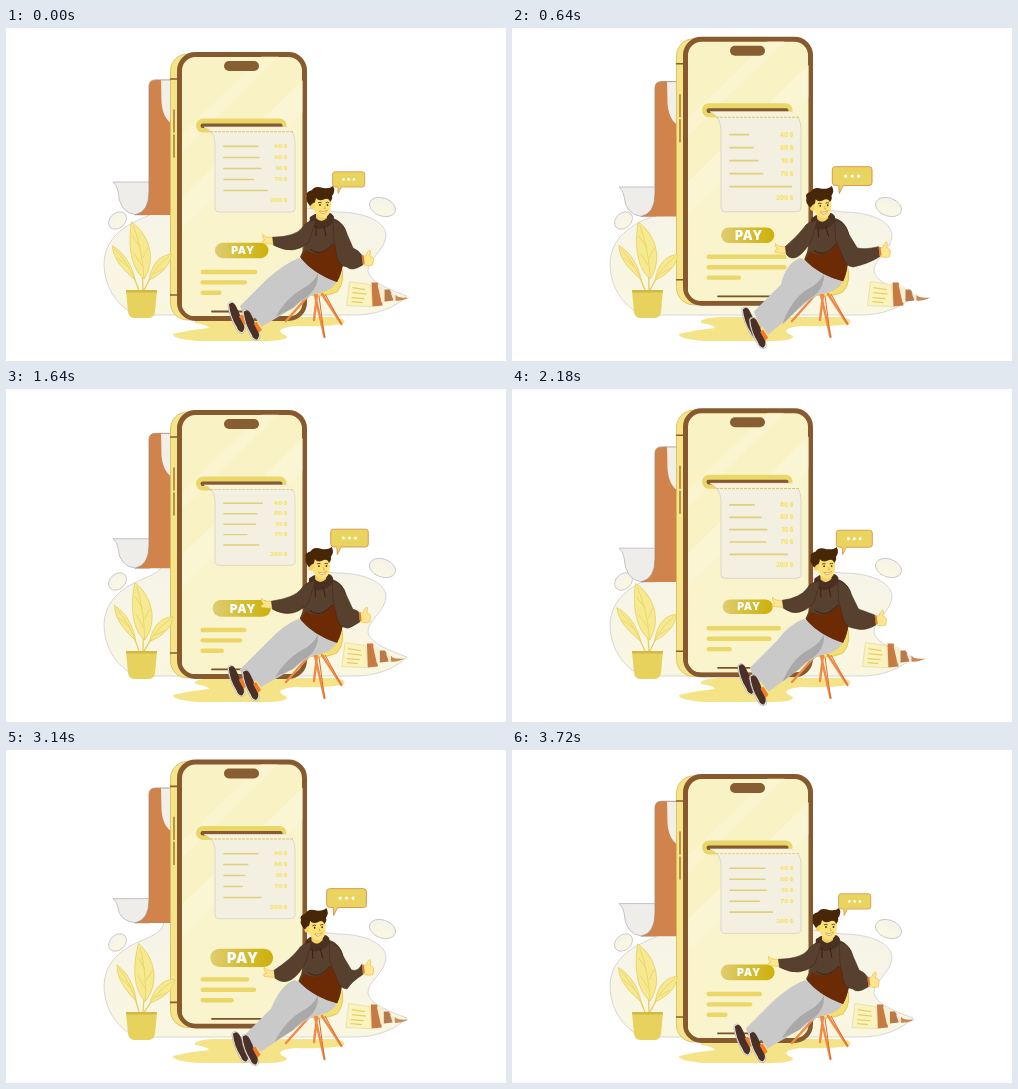
Animation, 500 px wide and 333 px high, one loop 3.74 s. Source, as an HTML page:

```html
<!DOCTYPE html>
<html lang="en">
<head>
<meta charset="utf-8">
<title>Mobile payment</title>
<style>
html, body { margin: 0; width: 100%; height: 100%; overflow: hidden; background: #fff; }
svg { display: block; width: 100vw; height: 100vh; }
text { font-family: Inter, Roboto, sans-serif; font-weight: 900; }
</style>
</head>
<body>
<svg viewBox="0 0 500 333">
  <defs>
    <clipPath id="screen"><rect x="175.5" y="4.5" width="121" height="260" rx="14"/></clipPath>
    <linearGradient id="gold" x1="0" x2="1">
      <stop offset="0" stop-color="#dfcd72"/><stop offset=".45" stop-color="#d6bf3c"/><stop offset="1" stop-color="#cdb00a"/>
    </linearGradient>
    <linearGradient id="ground" x1="0" y1="0" x2="0" y2="1">
      <stop offset="0" stop-color="#f5f3e9"/><stop offset="1" stop-color="#faf7e0"/>
    </linearGradient>
  </defs>

  <!-- backdrop -->
  <g stroke="#c9c7cd" stroke-width=".9" fill="url(#ground)">
    <path d="M165 166Q159 167 158 172C156 182 148 185 137 190C112 200 98 215 98 237C99 262 113 279 130 287H345C370 288 390 279 401 268C382 261 364 254 362 243C361 232 380 222 380 207C379 193 358 184 331 184L300 180Z" stroke-opacity=".8"/>
    <ellipse cx="376.5" cy="179" rx="13.5" ry="9" transform="rotate(20 376.5 179)"/>
    <ellipse cx="111.5" cy="192.5" rx="10" ry="7.5" transform="rotate(-42 111.5 192.5)"/>
  </g>
  <path d="M167 306Q182 302 203 300Q202 297 189 295Q187 290 208 289H325Q341 290 338 295Q326 299 289 298Q264 301 281 308Q282 314 246 313H192Q166 311 167 306Z" fill="#f5e387"/>

  <!-- long paper strip behind the phone -->
  <path id="roll" fill="#efedea" stroke="#bfbdc4" stroke-width=".9"/>
  <g id="strip">
    <path d="M143 6Q143 0 150 0H170V135H129Q143 132 143 112Z" fill="#d0834b"/>
    <path d="M155 0H171V46Q157 42 155.5 22Z" fill="#f1efe8"/>
    <path d="M129 135Q143 132 143 112V6Q143 0 150 0H170" fill="none" stroke="#a98a78" stroke-width=".8"/>
  </g>

  <!-- phone -->
  <g id="phone">
    <rect x="164.5" y="2" width="130" height="266" rx="17" fill="#f6e489" stroke="#d8b95a" stroke-width=".8"/>
    <path d="M164 27h8M164 243h8" stroke="#8a5a32" stroke-width="1.6"/>
    <path d="M168 58v22M168 83v22" stroke="#a9803a" stroke-width="1.6" stroke-linecap="round"/>
    <rect x="173.5" y="2.5" width="125" height="264" rx="16" fill="#f9f2c5" stroke="#86592f" stroke-width="5"/>
    <g clip-path="url(#screen)">
      <path d="M176 145L297 28V264H176Z" fill="#faf4cc"/>
      <path d="M176 145L297 28V60L176 177ZM176 82L256 4H273L176 99Z" fill="#fcf7da" opacity=".5"/>
    </g>
    <rect x="218" y="9" width="35" height="10" rx="5" fill="#875d32"/>
    <path d="M206 259.5h60" stroke="#7a5329" stroke-width="1.8" stroke-linecap="round"/>
    <rect x="190" y="66.5" width="90.5" height="14" rx="7" fill="#e9d768"/>
    <rect x="194.5" y="71.5" width="82" height="4.6" rx="2.3" fill="#86592f"/>
    <g id="bars" stroke="#ead768" stroke-width="4.4" stroke-linecap="round"></g>
    <g id="receipt">
      <path d="M198 0H279Q289 3 289 18V96Q289 100 285 100H213Q209 100 209 96V18Q208 4 198 0Z" fill="#f3f0e2" stroke="#d4d0c6" stroke-width=".8"/>
      <path d="M198 0H279Q285 1 287 5H205Q202 1 198 0Z" fill="#f7f2d9"/>
      <path d="M204 5.5H287" stroke="#dfc764" stroke-width="1.1" stroke-dasharray="3 1"/>
      <g id="rows" stroke="#dfd07b" stroke-width="1.8" stroke-linecap="round"></g>
      <g id="sums" fill="#f8e26a" font-size="6" text-anchor="end"></g>
    </g>
    <rect id="pill" x="-28" y="-8.1" width="56" height="16.2" rx="8.1" fill="url(#gold)"/>
    <g id="pay"><text x=".4" y="4.4" text-anchor="middle" font-size="12.4" letter-spacing=".8" fill="#fff">PAY</text></g>
  </g>

  <!-- plant -->
  <g id="plant" fill="#f7e98f" stroke="#e5cf62" stroke-width=".8">
    <path d="M137 263Q136 222 127 198M138 262Q148 240 163 228M133 262Q124 238 108 221" fill="none" stroke-width="1.3"/>
    <path d="M143 252C145 238 152 227 165 226C164 238 155 246 143 252Z"/>
    <path d="M129 252C119 243 107 233 106 218C117 224 126 237 129 252Z"/>
    <path d="M138 251C123 239 122 213 125 194C142 206 151 230 138 251Z"/>
    <path d="M138 251Q136 221 127 198M143 252Q150 238 163 228M129 252Q121 234 108 221M136 238L128 226M136.5 230L142 219M134 219L126 208M147 246L158 240M122 239L111 230" fill="none" stroke-width=".7"/>
  </g>
  <path d="M120 262H151L149 284Q148 290 142 290H129Q123 290 122 284Z" fill="#e6d25c"/>
  <path d="M120 262H151L150.8 264.5H120.2Z" fill="#d2b945"/>

  <!-- receipts and boxes -->
  <g id="pile">
    <path d="M1 0L22 3L24 25L-2 24Z" fill="#fbf3bd" stroke="#e3d9a8" stroke-width=".7"/>
    <path d="M4 6L17 8M4 11L18 12.5M3 16L16 17M3 20L14 21" stroke="#e5ce68" stroke-width="1.2"/>
    <path d="M23 1H29Q33 9 34 24L24 25Z" fill="#c77a42"/>
    <path d="M29 3L36 6L39 20L33 21Z" fill="#f5efd2"/>
    <path d="M36 8H41Q44 12 45 19L36 20Z" fill="#b97a4b"/>
    <path d="M42 11L48 15V19L45 19Z" fill="#f1ead0"/>
    <path d="M47 13Q49 17 61 16Q52 20 47 19Z" fill="#c98a58"/>
  </g>

  <!-- chair -->
  <path d="M334 234Q341 252 331 264Q317 270 304 267L310 256Z" fill="#f3df74" stroke="#ddc352" stroke-width=".8"/>
  <path d="M304 266L280 293M309 267L318.5 309M316 266L335.5 296M311 267L308 292" fill="none" stroke="#f08a47" stroke-width="2.4" stroke-linecap="round"/>
  <path d="M313 268L318.5 309M319 266L335.5 296" stroke="#d86f35" stroke-width="1"/>

  <!-- legs -->
  <path id="legA" fill="#c9c9c9"/>
  <g id="shoeA"></g>
  <path id="legB" fill="#c9c9c9"/>
  <path id="fold" fill="#a9a9aa"/>
  <g id="shoeB"></g>

  <!-- upper body -->
  <g fill="#fde68d" stroke="#e8b94c" stroke-width=".6">
    <path id="handL" d="M7 -2Q0 -1 -3 -5Q-4 -3 -1 1Q-5 2 -3 4Q2 5 9 5Z"/>
    <path id="handR" d="M-6 -4L-1 -4Q1 -9 3 -10Q5 -9 3 -4Q7 -3 7 0L6 5Q2 7 -5 4Z"/>
  </g>
  <g id="torso">
    <path d="M308 190Q300 193 299 202Q302 215 294 229Q306 245 331 254Q340 236 341 210Q339 194 327 190Z" fill="#57402e"/>
    <path d="M300 222Q312 230 324 220Q330 213 334 218Q338 222 337 232Q336 246 331 254Q308 246 295 230Z" fill="#6d2b05"/>
    <path d="M304 221Q314 230 327 216" fill="none" stroke="#3f2819" stroke-width="1"/>
    <path d="M304 189Q302 198 313 201Q328 199 328 189Q325 183 320 186H309Z" fill="#4a3021"/>
    <path d="M310 198v10M318 198l2 10" stroke="#33200f" stroke-width=".9"/>
    <path d="M310 181H321V190Q315 196 310 190Z" fill="#f3cf68"/>
    <path d="M307 170Q308 164 317 165Q326 166 325 176Q325 188 318 190Q308 189 307 177Z" fill="#fde277"/>
    <ellipse cx="306" cy="178" rx="2.4" ry="3.2" fill="#f8d460"/>
    <path d="M304 178Q299 172 301 168Q299 164 306 162Q309 157 317 160Q324 161 327 158Q330 163 326 168Q327 171 324 174Q323 170 319 171Q313 174 310 170Q309 176 307 175Z" fill="#482706"/>
    <path d="M312 174.8q2-1 3.6 0M319.6 174.8q2-1 3.4 0" fill="none" stroke="#482706" stroke-width=".8"/>
    <circle cx="314" cy="177" r=".9" fill="#482706"/><circle cx="321.5" cy="177" r=".9" fill="#482706"/>
    <path d="M318 178l1.5 2.5h-1.6" fill="none" stroke="#d99a35" stroke-width=".7"/>
    <path d="M313.5 183Q317.5 184.6 321.5 182.4Q320 185.4 317 185.6Q314.5 185.4 313.5 183Z" fill="#fff" stroke="#b5752f" stroke-width=".5"/>
  </g>
  <path id="armL" fill="#57402e" stroke="#412a1b" stroke-width=".6"/>
  <path id="armR" fill="#57402e" stroke="#412a1b" stroke-width=".6"/>
  <path id="cuffR" fill="none" stroke="#e07a2d" stroke-width="2"/>

  <!-- speech bubble, tail tip at the origin -->
  <g id="bubble">
    <path d="M-4 -27H30Q33 -27 33 -24V-11Q33 -8 30 -8H4L0 0L-.5 -8H-3Q-7 -8 -7 -11V-24Q-7 -27 -4 -27Z" fill="#e8d45f" stroke="#d98d48" stroke-width=".9"/>
    <g fill="#fff"><circle cx="6.5" cy="-17.5" r="1.6"/><circle cx="13" cy="-17.5" r="1.6"/><circle cx="19.5" cy="-17.5" r="1.6"/></g>
  </g>
</svg>
<script>
const LOOP = 3740, BEAT = LOOP / 2;
const NS = 'http://www.w3.org/2000/svg';
const $ = id => document.getElementById(id);

function add(parent, tag, attrs, text) {
  const el = document.createElementNS(NS, tag);
  for (const k in attrs) el.setAttribute(k, attrs[k]);
  if (text) el.textContent = text;
  return parent.appendChild(el);
}
const move = (id, value) => $(id).setAttribute('transform', value);
const shape = (id, d) => $(id).setAttribute('d', d);

// bars: [mean width, swing, time of the widest]
const rowWaves = [[30, 10, 1575], [28.5, 7.8, 0], [30, 9.5, 150], [28.5, 9, 380], [49, 14.5, 560]];
const barWaves = [[62, 18.5, 560], [61, 19.5, 720], [29.5, 8.6, 930]];
const rows = rowWaves.map((_, i) => add($('rows'), 'line', { x1: 218, y1: 22.8 + 13 * i, y2: 22.8 + 13 * i }));
const bars = barWaves.map((_, i) => add($('bars'), 'line', { x1: 196.7, y1: 220 + 10.4 * i, y2: 220 + 10.4 * i }));
['40 $', '80 $', '10 $', '70 $'].forEach((s, i) => add($('sums'), 'text', { x: 281.5, y: 25 + 13 * i }, s));
add($('sums'), 'text', { x: 281.5, y: 88 }, '200 $');

// toes at the origin, heel down to the right
for (const id of ['shoeA', 'shoeB']) {
  add($(id), 'path', { d: 'M-1 1Q1 -3 5 0Q9 7 12 16L16 25Q17 29 13 30Q9 30 7 25Q2 16 0 8Z', fill: '#f4f1ed', stroke: '#a9a09b', 'stroke-width': .6 });
  add($(id), 'path', { d: 'M0 1Q4 -3 7 3Q10 8 12 15L15 22Q16 27 13 29Q9 28 8 24Q1 13 0 1Z', fill: '#4b3027' });
  add($(id), 'path', { d: 'M10 13L13 11L18 19L15 22Z', fill: '#f47b25' });
}

function draw(t) {
  const wave = (mean, swing, peak) => mean + swing * Math.cos(2 * Math.PI * (t - peak) / BEAT);

  move('phone', `translate(0 ${wave(14, 10, 10)})`);
  move('receipt', `translate(0 75) scale(1 ${wave(.9, .1, 623)})`);
  rows.forEach((el, i) => el.setAttribute('x2', 216.5 + wave(...rowWaves[i])));
  bars.forEach((el, i) => el.setAttribute('x2', 192.5 + wave(...barWaves[i])));
  move('pill', `translate(235.7 198.4) scale(${wave(56.5, 6.5, 1260) / 56})`);
  move('pay', `translate(236.6 198.4) scale(${wave(1, .18, 1100)})`);

  const drop = wave(48, 10, 350), lip = wave(154, 6, 470);
  move('strip', `translate(0 ${drop})`);
  shape('roll', `M107 ${lip}H144V${drop + 135}H130Q113 ${drop + 133} 112 ${lip + 9}Q111 ${lip + 3} 107 ${lip}Z`);

  move('plant', `rotate(${wave(2.5, 3.8, 1230)} 135 263)`);
  move('pile', `translate(${wave(347.5, 10, 623)} 253.6)`);

  // legs
  const ax = wave(227, 4.5, 800), ay = wave(279.5, 4.5, 1050);
  const bx = wave(237.5, 1, 400), by = wave(286.5, 4.5, 760);
  move('shoeA', `translate(${ax} ${ay})`);
  move('shoeB', `translate(${bx} ${by})`);
  const lean = wave(-3.9, 3.9, 0), hip = 293 + lean * .8;
  shape('legA', `M${hip} 230Q${hip - 14} 235 ${ax + 38} ${ay - 24}L${ax + 11} ${ay + 3}L${ax + 18} ${ay + 19}L300 263L325 245Z`);
  shape('legB', `M${hip + 4} 231L331 252Q328 263 309 266Q298 270 289 279L${bx + 18} ${by + 16}L${bx + 10} ${by + 5}Q265 260 287 249Z`);
  shape('fold', `M312 245Q313 259 302 268Q292 274 287 280L${bx + 32} ${by + 6}Q280 270 296 261Q308 255 312 245Z`);

  // upper body leans from the hip, hands travel on their own
  const s = lean * .72;
  move('torso', `rotate(${lean * .74} 322 252)`);
  const lx = wave(262.5, 4, 700), ly = wave(218, 7, 1000);
  const rx = wave(365.5, 7, 640), ry = wave(225, 7.5, 120);
  move('handL', `translate(${lx} ${ly})`);
  move('handR', `translate(${rx - 1} ${ry})`);
  shape('armL', `M${310 + s} 192Q${300 + s} 193 ${296 + s} 200Q${289 + s} 209 ${lx + 7} ${ly - 2}L${lx + 8} ${ly + 6}Q${288 + s} ${ly + 17} ${303 + s} 214Z`);
  shape('armR', `M${327 + s} 192Q${338 + s} 194 ${341 + s} 206L${347 + s * .4} 220Q352 222 ${rx - 6} ${ry - 5}L${rx - 5} ${ry + 5}Q${rx - 16} ${ry + 12} 341 239Q333 238 331 229L${328 + s} 212Z`);
  shape('cuffR', `M${rx - 5} ${ry - 4.5}L${rx - 4} ${ry + 4}`);

  const puff = (36 - 3.8 * Math.cos(6 * Math.PI * t / LOOP)) / 40;
  move('bubble', `translate(${wave(329, 3.2, 0)} 165.5) scale(${puff})`);
}

const start = performance.now();
function tick() {
  draw((performance.now() - start) % LOOP);
  requestAnimationFrame(tick);
}
draw(0);
requestAnimationFrame(tick);
</script>
</body>
</html>
```
